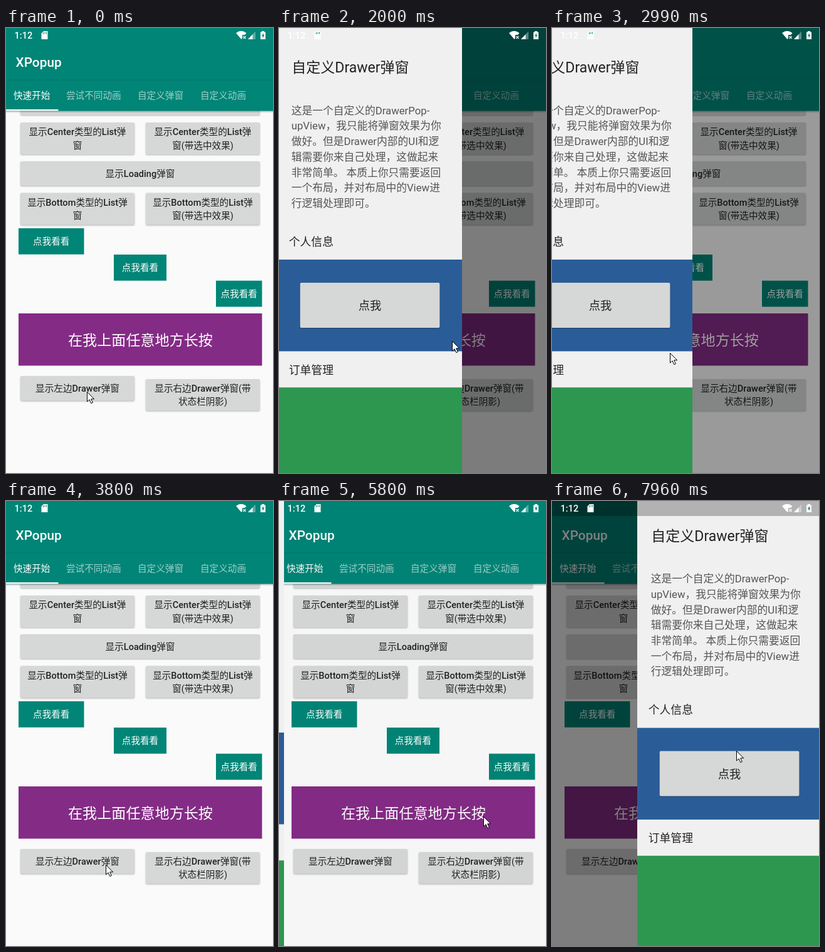
These frames come from a looping animation (426 by 711 pixels, 8000 ms). An HTML page:

```html
<!DOCTYPE html>
<html lang="zh-CN">
<head>
<meta charset="utf-8">
<title>Drawer popup demo</title>
<style>
  html, body { margin: 0; width: 100%; height: 100%; overflow: hidden; background: #fafafa; }
  svg { display: block; width: 426px; height: 711px; }
  text { font-family: Roboto, "Noto Sans CJK SC", "Noto Sans CJK", sans-serif; white-space: pre; }
  .mid { text-anchor: middle; }
  .latin, .medium { font-weight: 500; }
  .shadow { filter: drop-shadow(0 1px 1px rgba(0, 0, 0, .28)); }
</style>
</head>
<body>
<svg viewBox="0 0 426 711">
  <defs>
    <linearGradient id="fall" x2="0" y2="1">
      <stop stop-opacity=".28"/><stop offset="1" stop-opacity="0"/>
    </linearGradient>
  </defs>
  <rect width="426" height="711" fill="#fafafa"/>
  <g id="page"></g>
  <rect id="scrim" width="426" height="711"/>
  <g id="drawer">
    <rect width="294" height="711" fill="#f0f0f0"/>
    <g id="content"></g>
  </g>
  <rect id="shade" width="426" height="24"/>
  <g id="status" fill="#fff">
    <path d="M60 5h6.5v13h-10v-9.500z"/>
    <path d="M59.500 7v3M62 6.500v3M64.500 6.500v3" stroke="#008577"/>
    <path d="M367 8q8-6.500 16.500 0l-2.500 3h-4v5l-1.500 2z"/>
    <path d="M378.500 13l4 4m0-4l-4 4" stroke="#fff" stroke-width="1.300"/>
    <path d="M386 18l12-12.500v12.500z" opacity=".35"/>
    <path d="M386 18l7.500-7.800v7.800z"/>
    <path d="M408 5h4v1.500h2v11.500h-8v-11.500h2z"/>
    <path d="M410.700 8l-2.700 4.700h1.700v3.300l2.600-4.700h-1.600z" fill="#008577"/>
  </g>
  <path id="cursor" d="M.5 .5v15.500l3.600-3.300 2.700 6 2.600-1.200-2.700-5.700h5z" fill="#fff" stroke="#000"/>
</svg>
<script>
const $ = id => document.getElementById(id);

// Text whose glyphs are centred vertically on y.
const text = (x, y, size, str, fill = '#fff', cls = '') =>
  `<text x="${x}" y="${(y + .37 * size).toFixed(2)}" font-size="${size}" fill="${fill}" class="${cls}">${str}</text>`;
const box = (x, y, w, h, fill, more = '') =>
  `<rect x="${x}" y="${y}" width="${w}" height="${h}" fill="${fill}" ${more}/>`;
const mixed = str => str.replace(/[A-Za-z]+/g, '<tspan class="latin">$&</tspan>');

function button(x, y, w, h, lines, id = '') {
  const first = y + h / 2 - (lines.length - 1) * 10.8;
  return box(x, y, w, h, '#d6d7d7', 'rx="2" class="shadow"') +
    (id && box(x, y, w, h, '#000', `rx="2" id="${id}" opacity="0"`)) +
    lines.map((s, i) => text(x + w / 2, first + i * 21.6, 14.6, mixed(s), '#222', 'mid')).join('');
}
const tealButton = (x, y, w) =>
  box(x, y, w, 41.7, '#008577') + text(x + w / 2, y + 21, 14.6, '点我看看', '#fff', 'mid');

$('page').innerHTML =
  button(23, 100, 382, 39, []) +
  button(23, 151, 182, 51, ['显示Center类型的List弹', '窗']) +
  button(223, 151, 182, 51, ['显示Center类型的List弹', '窗(带选中效果)']) +
  button(23, 213, 382, 39, ['显示Loading弹窗']) +
  button(23, 263.5, 182, 51, ['显示Bottom类型的List弹', '窗']) +
  button(223, 263.5, 182, 51, ['显示Bottom类型的List弹', '窗(带选中效果)']) +
  tealButton(20, 320, 104.5) + tealButton(172, 362, 84) + tealButton(335, 403.7, 73.5) +
  box(20, 456, 388.5, 83.5, '#842b86') +
  text(214.5, 498, 23.1, '在我上面任意地方长按', '#fff', 'mid') +
  button(23, 556, 182, 39.5, ['显示左边Drawer弹窗'], 'pressLeft') +
  button(223, 561, 182, 50.5, ['显示右边Drawer弹窗(带', '状态栏阴影)'], 'pressRight') +
  box(0, 132, 426, 4, 'url(#fall)') +
  box(0, 0, 426, 132.5, '#008577') +
  box(0, 82.5, 426, 1, '#000', 'opacity=".14"') +
  box(0, 130, 83.5, 2.3, '#fff') +
  text(15.5, 54.3, 20.8, 'XPopup', '#fff', 'medium') +
  [[12, '快速开始'], [96, '尝试不同动画'], [210, '自定义弹窗'], [310, '自定义动画']]
    .map(([x, s], i) => text(x, 107.5, 14.6, s, i ? '#9fd0ca' : '#fff')).join('');

const paragraph = ['这是一个自定义的DrawerPop-', 'upView，我只能将弹窗效果为你', '做好。但是Drawer内部的UI和逻',
  '辑需要你来自己处理，这做起来', '非常简单。 本质上你只需要返回', '一个布局，并对布局中的View进', '行逻辑处理即可。'];

$('content').innerHTML =
  text(22.3, 62.5, 23, '自定义Drawer弹窗', '#222') +
  paragraph.map((s, i) => text(21.7, 131.5 + i * 24.7, 16.75, s, '#555')).join('') +
  text(17.8, 341, 17.8, '个人信息', '#222') +
  box(0, 370, 294, 146.5, '#2a5d98') +
  box(35.7, 407, 222.7, 72, '#d6d7d7', 'rx="2" class="shadow"') +
  text(147, 443.5, 18.3, '点我', '#222', 'mid') +
  text(17.8, 546, 17.8, '订单管理', '#222') +
  box(0, 574.3, 294, 160, '#2d9750');

$('status').insertAdjacentHTML('beforeend', text(13.5, 12, 14.6, '1:12', '#fff', 'medium'));

const LOOP = 8000, STEP = 90.4;

const pointer = [
  [0, 129, 581], [1, 129, 581], [2, 130, 579], [3, 131, 580], [12, 131, 580], [19, 282, 502],
  [20, 282, 502], [22, 276, 500], [33, 188, 519], [35, 166, 523], [39, 254, 531], [41, 182, 570],
  [42, 159, 581], [48, 159, 581], [55, 345, 420], [60, 345, 420], [67, 311, 567], [71, 307, 584],
  [79, 307, 584], [86, 295, 417], [88, 294, 399]
];

function at(track, n) {
  const i = track.findIndex(k => k[0] >= n);
  if (i < 1) return track[i < 0 ? track.length - 1 : 0].slice(1);
  const a = track[i - 1], b = track[i], f = (n - a[0]) / (b[0] - a[0]);
  return a.slice(1).map((v, j) => Math.round(v + (b[j + 1] - v) * f));
}

// Share of the way still to go, k steps into a settling slide.
const rest = (k, length = 11) => Math.max(0, 1 - (k + .59) / length) ** 5;
const dragged = n => 1 + Math.min(0, at(pointer, n)[0] - 256) / 292;

function openness(n) {
  if (n < 11) return 0;
  if (n < 22) return 1 - rest(n - 11);
  if (n <= 35) return dragged(n);
  if (n < 47) return dragged(35) * rest(n - 36, 5);
  if (n < 59) return 1 - rest(n - 47);
  if (n < 78) return rest(n - 59);
  return 1 - rest(n - 78);
}

const press = (n, down, up) => n < down || n >= up ? 0 : n === down ? .06 : .12;

function draw(n) {
  const p = openness(n), right = n >= 78;
  const x = right ? 426 - Math.round(290 * p) : Math.round(292 * p) - 294;
  const scroll = n < 87 ? 0 : n < 88 ? -3 : -7.5;
  const [cx, cy] = at(pointer, n);
  $('drawer').setAttribute('transform', `translate(${x})`);
  $('content').setAttribute('transform', `translate(0 ${scroll})`);
  $('scrim').setAttribute('opacity', .5 * p);
  $('shade').setAttribute('opacity', right ? .26 * p : 0);
  $('pressLeft').setAttribute('opacity', press(n, 6, 11));
  $('pressRight').setAttribute('opacity', press(n, 75, 78));
  $('cursor').setAttribute('transform', `translate(${cx} ${cy})`);
}

function tick() {
  draw(Math.floor((performance.now() % LOOP + 2) / STEP));
  requestAnimationFrame(tick);
}
tick();
</script>
</body>
</html>
```
